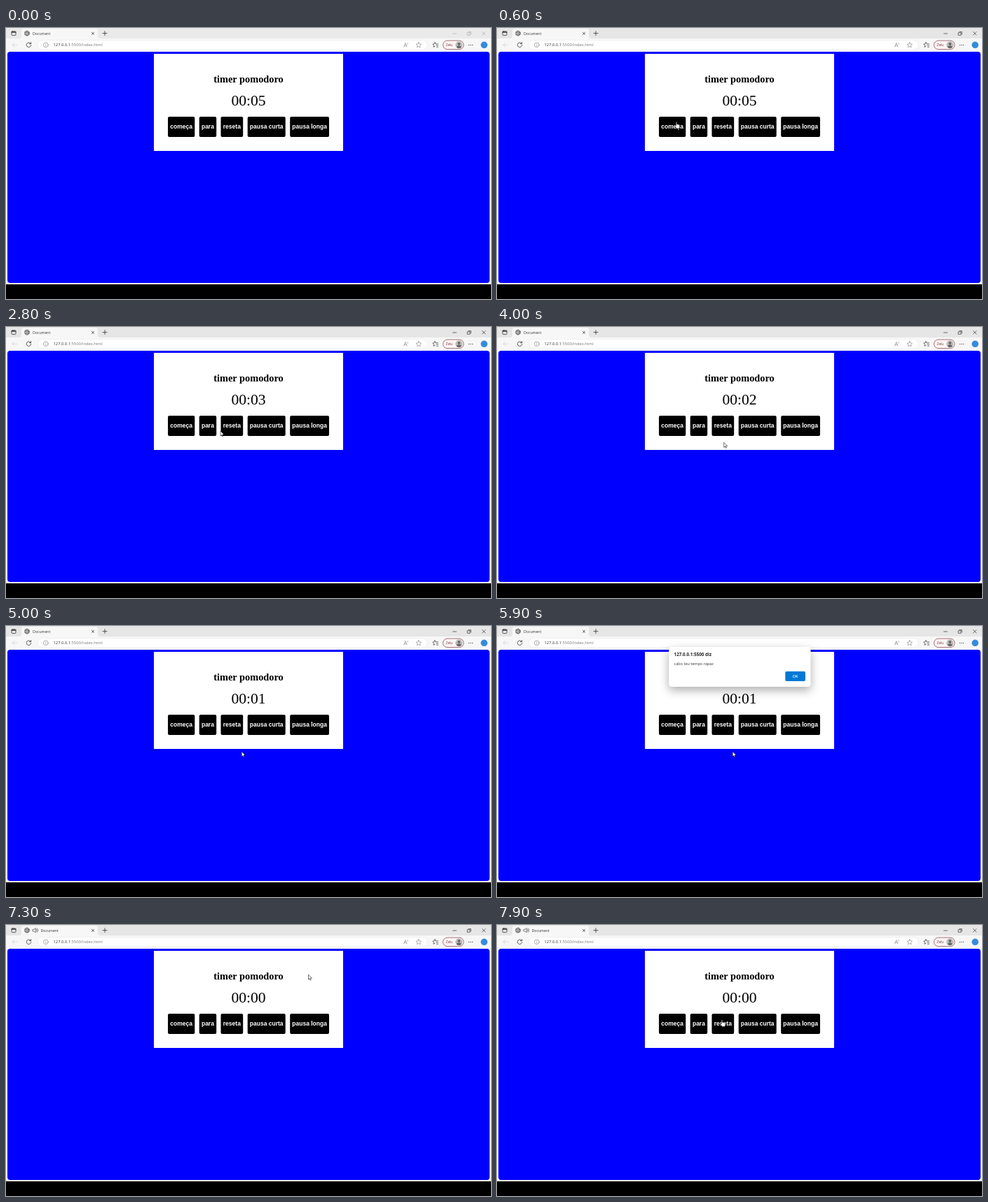
An HTML page that plays this animation: 692 by 388 pixels, repeating every 8000 ms.

```html
<!DOCTYPE html>
<html lang="pt-BR">
<head>
<meta charset="utf-8">
<title>timer pomodoro</title>
<style>
  html, body { margin: 0; width: 100%; height: 100%; overflow: hidden; background: #000; }
  svg { display: block; width: 692px; height: 388px; }
  text { font-family: "Open Sans", "Noto Sans", sans-serif; white-space: pre; }
  .line { fill: none; stroke: #333; stroke-width: .8; stroke-linecap: round; stroke-linejoin: round; }
  .pale { stroke: #777; stroke-width: .6; }
  .serif { font-family: "Liberation Serif", serif; text-anchor: middle; }
  .button { font: bold 8.5px "Liberation Sans", sans-serif; fill: #fff; text-anchor: middle; }
  #dialog > rect:first-child { filter: drop-shadow(0 5px 7px rgba(0, 0, 0, .32)); }
</style>
</head>
<body>
<svg viewBox="0 0 692 388">
  <!-- browser window -->
  <rect id="strip" width="692" height="20"/>
  <path d="M0 15H19Q22 15 22 12V4Q22 1 25 1H128Q131 1 131 4V12Q131 15 134 15H692V367H0Z" fill="#f7f7f7"/>
  <rect x="45.5" y="17.5" width="555.5" height="13.5" rx="6.7" fill="#fff" stroke="#e4e4e4" stroke-width=".5"/>
  <rect x="2" y="34" width="688" height="331" rx="4" fill="#00f"/>

  <!-- tabs -->
  <g class="line">
    <rect x="8" y="4.8" width="6" height="5.8" rx="1.2"/>
    <path d="M8.2 6H13.8" stroke-width="1.4"/>
    <g stroke-width=".6">
      <circle cx="30" cy="7.6" r="3.5"/>
      <ellipse cx="30" cy="7.6" rx="1.5" ry="3.5"/>
      <path d="M26.8 6.4H33.2M26.8 8.8H33.2"/>
    </g>
    <path d="M122.4 6.2L125.6 9.4M125.6 6.2L122.4 9.4M138 7.6H144M141 4.6V10.6"/>
    <path id="speaker" d="M38.3 6.3H40L42.2 4.4V10.8L40 8.9H38.3ZM43.6 6.1Q44.6 7.6 43.6 9.1M44.8 4.9Q46.8 7.6 44.8 10.3" stroke-width=".6"/>
    <path id="controls" d="M637.5 8H642.5M658.5 6.8H662V10.3H658.5ZM659.8 5.5H663.3V9M679.5 5.5L684 10M684 5.5L679.5 10" stroke-width=".7"/>
  </g>
  <text id="tabTitle" y="9.7" font-size="5.2" fill="#333">Document</text>

  <!-- toolbar -->
  <g class="line">
    <path d="M16 24.2H9M12 21.2L9 24.2L12 27.2" stroke="#d2d2d2"/>
    <path d="M35.3 22.4A3.3 3.3 0 1 0 35.8 24.6M35.6 20.6V22.7H33.5"/>
    <g class="pale">
      <circle cx="56.8" cy="24.2" r="3.4"/>
      <path d="M56.8 23.8V26M56.8 22.4V22.5"/>
      <path d="M567.6 27L569.8 21.4L572 27M568.4 25.2H571.2M573 21.4Q574 22.4 573 23.4"/>
      <path id="star" d="M588.8 20.4L589.9 22.9L592.5 23.2L590.6 25L591.1 27.7L588.8 26.4L586.5 27.7L587 25L585.1 23.2L587.7 22.9Z"/>
    </g>
    <path d="M612 20.6L613 22.8H616.5M614 25H616.5M614.5 27.2H616.5M612 20.6L611 22.8L608.8 23.1L610.4 24.8L610 27.3L612 26.2" stroke-width=".7"/>
  </g>
  <text x="67.5" y="26.4" font-size="5.8" fill="#333">127.0.0.1<tspan fill="#777">:5500/index.html</tspan></text>
  <rect x="623.5" y="18" width="29.5" height="12.6" rx="6.3" fill="#fcf4f4" stroke="#8c4f55" stroke-width=".8"/>
  <text x="627.6" y="26" font-size="4.9" fill="#7b3940">Zelu</text>
  <circle cx="646.3" cy="24.3" r="5" fill="#bcbcbc"/>
  <path d="M642.8 27.8Q643 25.2 646.3 25.2T649.8 27.8Q646.3 30.6 642.8 27.8Z" fill="#666"/>
  <circle cx="646.3" cy="22.8" r="1.9" fill="#666"/>
  <path d="M660.5 24.3H660.6M663 24.3H663.1M665.5 24.3H665.6" class="line" style="stroke-width:1.2"/>
  <circle cx="682.2" cy="24.3" r="4.8" fill="#358bdc"/>

  <!-- page -->
  <rect x="211" y="37" width="270" height="139" fill="#fff"/>
  <text class="serif" x="346" y="77.6" font-size="14.35" font-weight="bold">timer pomodoro</text>
  <text class="serif" id="clock" x="346" y="110.7" font-size="21.6"></text>
  <g id="buttons"></g>

  <g id="dialog">
    <rect x="245.3" y="32" width="202.2" height="57" rx="4" fill="#fff"/>
    <text x="252.6" y="45.4" font-size="6.26" font-weight="bold" fill="#222">127.0.0.1:5500 diz</text>
    <text x="252.6" y="58.2" font-size="5.53" fill="#333">cabo teu tempo rapaz</text>
    <rect id="ok" x="411.3" y="67" width="28.7" height="14" rx="2" fill="#0078d4"/>
    <text x="425.5" y="76" font-size="5.3" font-weight="600" fill="#fff" text-anchor="middle">OK</text>
  </g>

  <g id="cursor" fill="#fff" stroke="#000" stroke-width="1.2">
    <path id="arrow" d="M0 0V16L3.7 12.4L6 18L8.3 17L6 11.5H11Z"/>
    <path id="hand" d="M-1.5 1a1.5 1.5 0 0 1 3 0V7l7 1.5q2 .5 2 2.5v5q0 2-2 5h-8q-1-2-5-7-1.5-2 .5-2.5 1.2-.2 2.5 1.5z"/>
  </g>
</svg>
<script>
const LOOP = 8000, STEP = 100;
const $ = id => document.getElementById(id);
const show = (id, on) => $(id).setAttribute('visibility', on ? 'visible' : 'hidden');

// label, left, right
const buttons = [
  ['começa', 231, 269.3], ['para', 275.7, 300.2], ['reseta', 306.5, 338.2],
  ['pausa curta', 344.7, 398.7], ['pausa longa', 405.2, 461]
];
const TOP = 127, BOTTOM = 156;
$('buttons').innerHTML = buttons.map(([label, left, right]) =>
  `<rect x="${left}" y="${TOP}" width="${right - left}" height="${BOTTOM - TOP}" rx="2"/>
   <text class="button" x="${(left + right) / 2}" y="144.2">${label}</text>`).join('');

// pointer stops: time, x, y
const path = [
  [200, 290, 180], [500, 256, 134.5], [1000, 256, 134.5], [1500, 306, 148.8],
  [3400, 306, 148.8], [4300, 330, 171], [4400, 330, 171], [5000, 336.2, 179.8],
  [6000, 336.2, 179.8], [6500, 408, 92], [6600, 408, 92], [7000, 431.5, 71],
  [7300, 431.5, 71], [7500, 415, 115], [7900, 321, 136]
];

function pointerAt(t) {
  const next = path.findIndex(stop => stop[0] > t);
  if (next < 0) return path[path.length - 1].slice(1);
  const [t0, x0, y0] = path[Math.max(0, next - 1)], [t1, x1, y1] = path[next];
  const u = Math.max(0, Math.min(1, (t - t0) / (t1 - t0)));
  const k = u * u * (3 - 2 * u);
  return [x0 + (x1 - x0) * k, y0 + (y1 - y0) * k];
}

function secondsLeft(t) {
  const ticks = t < 1800 ? 0 : Math.floor((t - 800) / 1000);
  return t < 6000 ? Math.max(1, 5 - ticks) : 0;
}

function draw(t) {
  const active = t >= 200, sound = t >= 6000;
  $('strip').setAttribute('fill', active ? '#e6e6e6' : '#eaeaea');
  $('controls').style.stroke = active ? '#333' : '#aaa';
  show('speaker', sound);
  $('tabTitle').setAttribute('x', sound ? 49.5 : 38);
  $('clock').textContent = '00:0' + secondsLeft(t);

  const entry = Math.min(1, (t - 5780) / 220);
  show('dialog', t >= 5800 && t < 7300);
  $('dialog').setAttribute('transform', `translate(0 ${-10 * (1 - entry) ** 2})`);
  $('dialog').setAttribute('opacity', Math.max(0, Math.min(1, .1 + entry * 2.5)));

  const [x, y] = pointerAt(t);
  const overButton = y >= TOP && y <= BOTTOM &&
    buttons.some(([, left, right]) => x >= left && x <= right);
  $('cursor').setAttribute('transform', `translate(${x} ${y}) scale(.45)`);
  show('arrow', active && !overButton);
  show('hand', active && overButton);
}

const start = performance.now();
function frame() {
  const t = (performance.now() - start) % LOOP;
  draw(Math.floor(t / STEP) * STEP);
  requestAnimationFrame(frame);
}
frame();
</script>
</body>
</html>
```
